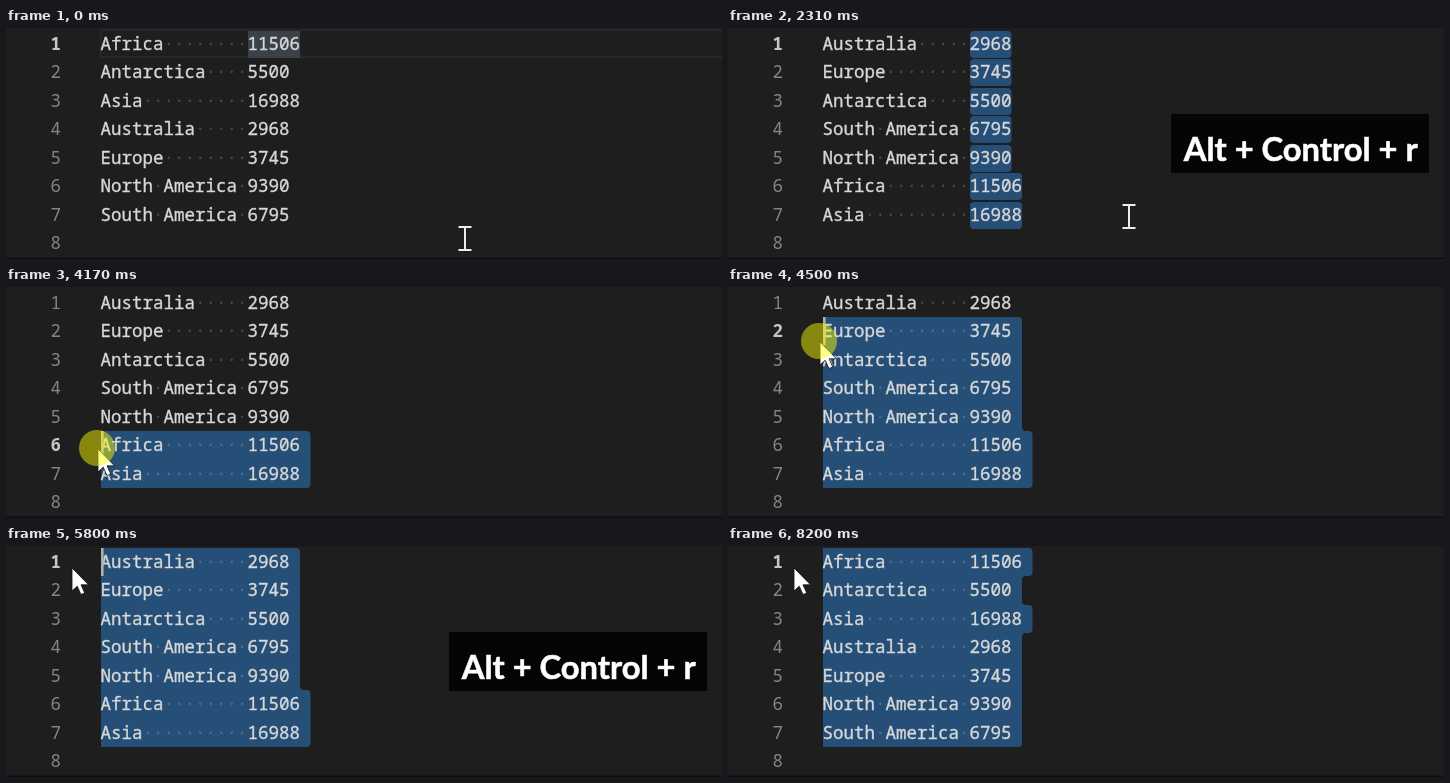
Write an HTML page that moves like this. It is 716 px wide and 231 px high and loops after 8.73 s.

```html
<!DOCTYPE html>
<html lang="en">
<head>
<meta charset="utf-8">
<title>Sorting lines in an editor</title>
<style>
  html, body { margin: 0; width: 100%; height: 100%; overflow: hidden; background: #1e1e1e; }
  svg { display: block; width: 716px; height: 231px; }
  text { white-space: pre; }
  .code { font: 17.5px "Noto Sans Mono", monospace; font-variant-ligatures: none; fill: #d8d8d8; }
  .code .plain { stroke: #d8d8d8; stroke-width: .35; }
  .code .dots { fill: #e3e4e2; fill-opacity: .23; }
  .code .num { fill: #858585; }
  .code .num.on { fill: #c6c6c6; font-weight: 700; }
  .sel { fill: #264f78; }
  .word { fill: #3a4149; }
  .line { fill: none; stroke: #282828; stroke-width: 2; }
  .caret { fill: #aeafad; }
  .keys rect { fill: #050505; }
  .keys text { font: 700 32.7px Lato, sans-serif; fill: #fff; stroke: #fff; stroke-width: .6; text-anchor: middle; }
  .beam { fill: none; stroke: #ececec; stroke-width: 2; }
  .arrow { fill: #fff; stroke: #111; stroke-width: .8; }
  .press { fill: #ff0; fill-opacity: .47; }
</style>
</head>
<body>
<svg viewBox="0 0 716 231">
  <rect width="716" height="231" fill="#1e1e1e"/>
  <g id="back"></g>
  <g id="code" class="code"></g>
  <g id="carets"></g>
  <rect y="229.5" width="716" height="1.5" fill="#120c0d"/>
  <g id="keys" class="keys">
    <rect x="443" y="86" width="258" height="59"/>
    <text x="572.7" y="133">Alt + Control + r</text>
  </g>
  <g id="mouse"></g>
</svg>
<script>
const LOOP = 8730, LEFT = 95, TOP = 2, CHAR = 10.5, ROW = 28.5, COL = 14, R = 4;

const byName = [
  ['Africa', 11506], ['Antarctica', 5500], ['Asia', 16988], ['Australia', 2968],
  ['Europe', 3745], ['North America', 9390], ['South America', 6795]
];
const bySize = [...byName].sort((a, b) => a[1] - b[1]);

// Each step changes part of the state; sel is null, 'column' or the first selected row.
const steps = [
  [0, { rows: byName, sel: null, active: 0, caret: false, keys: false, word: true,
        mouse: [459, 210], arrow: false, press: false }],
  [110, { mouse: [456, 209] }],
  [220, { mouse: [445, 205] }],
  [330, { mouse: [428, 199] }],
  [450, { mouse: [412, 192] }],
  [560, { mouse: [404, 189], caret: true }],
  [670, { mouse: [401, 188] }],
  [1010, { sel: 'column', word: false, press: true }],
  [1110, { press: false }],
  [1560, { caret: false }],
  [1870, { caret: true, rows: bySize, keys: true }],
  [2310, { caret: false }],
  [2850, { caret: true, keys: false }],
  [3310, { caret: false }],
  [3420, { mouse: [400, 190] }],
  [3530, { mouse: [394, 197] }],
  [3640, { mouse: [381, 207] }],
  [3740, { mouse: [363, 215] }],
  [3840, { mouse: [290, 220] }],
  [3940, { mouse: [175, 219] }],
  [4050, { mouse: [92, 216], arrow: true, press: true, sel: null, active: 7, caret: true }],
  [4170, { mouse: [92, 162], sel: 5, active: 5 }],
  [4270, { mouse: [92, 112], sel: 3, active: 3 }],
  [4380, { mouse: [92, 78], sel: 2, active: 2 }],
  [4500, { mouse: [92, 55], sel: 1, active: 1 }],
  [4600, { mouse: [82, 29], sel: 0, active: 0 }],
  [4710, { mouse: [70, 23] }],
  [4820, { mouse: [66, 22] }],
  [5050, { press: false }],
  [5240, { caret: false }],
  [5800, { caret: true, keys: true }],
  [5910, { rows: byName }],
  [6240, { caret: false }],
  [6790, { caret: true, keys: false }],
  [7220, { caret: false }],
  [7750, { caret: true }],
  [8200, { caret: false }]
];

const $ = id => document.getElementById(id);
const rowY = i => TOP + Math.floor(i * ROW);
const colX = c => LEFT + c * CHAR;
const endCol = row => COL + String(row[1]).length;

function box(cls, x, y, w, h, r = 0) {
  return `<rect class="${cls}" x="${x}" y="${y}" width="${w}" height="${h}" rx="${r}"/>`;
}

function text(cls, x, i, s) {
  return `<text class="${cls}" x="${x - 0.5}" y="${rowY(i) + 20}">${s}</text>`;
}

// Outline of whole selected lines, rounded wherever the right edge turns.
function linesPath(rows, first) {
  const right = i => colX(endCol(rows[i]) + 1) - 0.5;
  let d = `M${LEFT} ${rowY(first)}H${right(first) - R}q${R} 0 ${R} ${R}`;
  for (let i = first; i < rows.length - 1; i++) {
    const x = right(i), next = right(i + 1), y = rowY(i + 1);
    if (next === x) continue;
    const s = next > x ? R : -R;
    d += `V${y - R}q0 ${R} ${s} ${R}H${next - s}q${s} 0 ${s} ${R}`;
  }
  return d + `V${rowY(rows.length) - R}q0 ${R} ${-R} ${R}H${LEFT}Z`;
}

function drawBack({ rows, sel, active, word }) {
  if (sel === 'column') {
    return rows.map((row, i) =>
      box('sel', colX(COL), rowY(i) + 1, (endCol(row) - COL) * CHAR - 0.5, 27, R)).join('');
  }
  if (sel !== null) return `<path class="sel" d="${linesPath(rows, sel)}"/>`;
  const line = box('line', LEFT, rowY(active), 640, 27);
  return line + (word ? box('word', colX(COL), TOP + 1, 5 * CHAR - 0.5, 27) : '');
}

function drawCode({ rows, active }) {
  let out = '';
  for (let i = 0; i < 8; i++) out += text(i === active ? 'num on' : 'num', 45, i, i + 1);
  rows.forEach(([name, size], i) => {
    const padded = name.padEnd(COL);
    const dots = padded.replace(/\S/g, '\u00a0').replace(/ /g, '·');
    out += text('dots', LEFT, i, dots) + text('plain', LEFT, i, name) + text('plain', colX(COL), i, size);
  });
  return out;
}

function drawCarets({ rows, sel, active, caret, word }) {
  if (!caret) return '';
  const bar = (x, i) => box('caret', Math.max(LEFT, x - 1), rowY(i), 2.6, 28);
  if (sel === 'column') return rows.map((row, i) => bar(colX(endCol(row)), i)).join('');
  return bar(word ? colX(COL) : LEFT, active);
}

function drawMouse({ mouse: [x, y], arrow, press }) {
  const shape = arrow
    ? '<path class="arrow" d="M0 0V23L5.2 18.2L9 26.5L12.7 25L9 16.8H16.5Z"/>'
    : '<path class="beam" d="M-6.5 -11H6.5M0 -11V12M-6.5 12H6.5"/>';
  const spot = press ? `<circle class="press" cx="${arrow ? -1 : -3}" cy="-1" r="18"/>` : '';
  return `<g transform="translate(${x} ${y})">${shape}${spot}</g>`;
}

const start = performance.now();
let shown = 0;

function tick() {
  const t = (performance.now() - start) % LOOP;
  const past = steps.filter(([at]) => at <= t);
  if (past.length !== shown) {
    shown = past.length;
    const state = Object.assign({}, ...past.map(([, change]) => change));
    $('back').innerHTML = drawBack(state);
    $('code').innerHTML = drawCode(state);
    $('carets').innerHTML = drawCarets(state);
    $('keys').style.display = state.keys ? '' : 'none';
    $('mouse').innerHTML = drawMouse(state);
  }
  requestAnimationFrame(tick);
}

tick();
</script>
</body>
</html>
```
